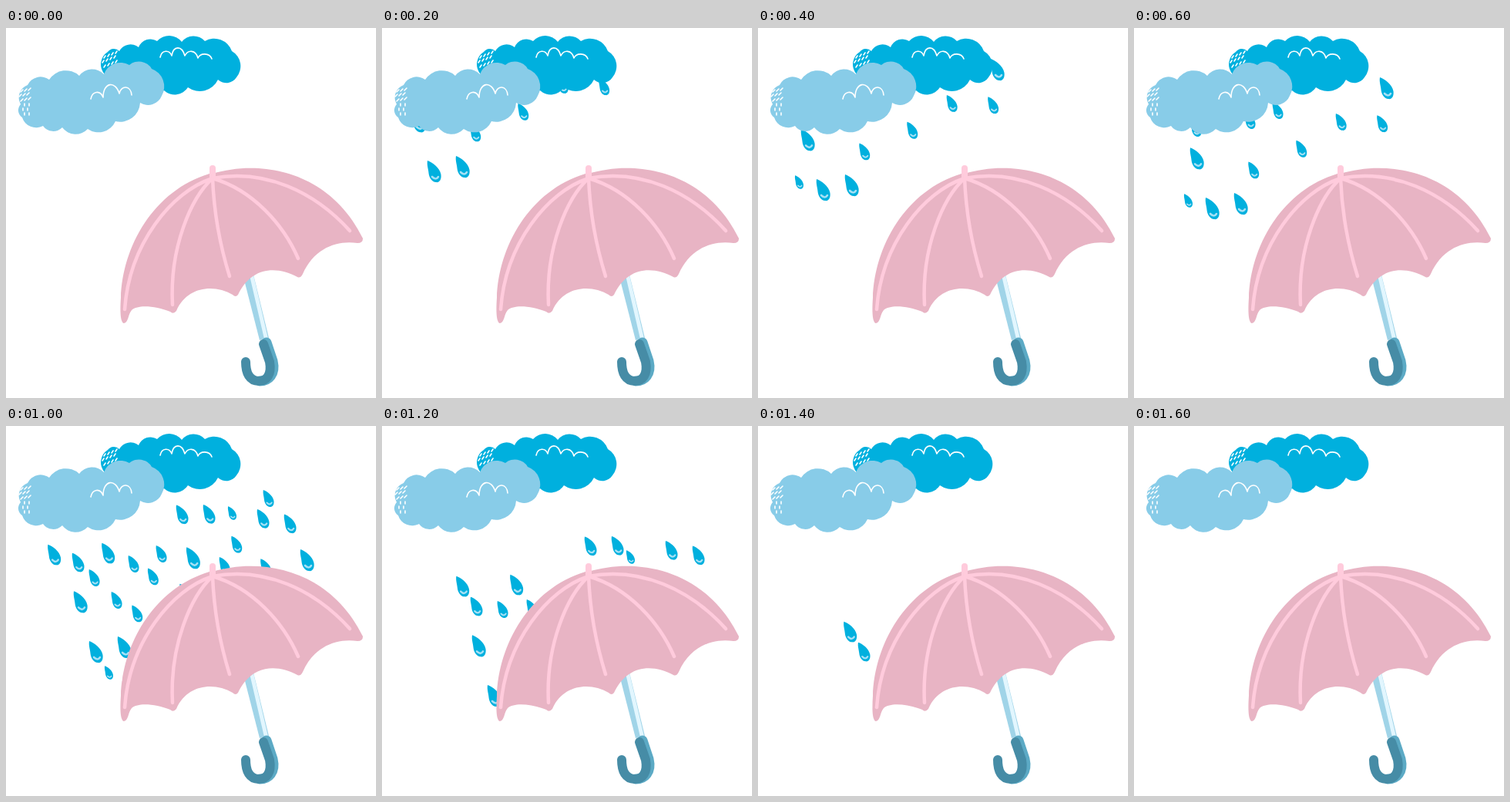
An HTML page for the animation above (1.8 s loop, 480x480 px).

```html
<!DOCTYPE html>
<html>
<head>
<meta charset="utf-8">
<style>
html, body { margin: 0; width: 100%; height: 100%; overflow: hidden; background: #fff; }
svg { display: block; width: 100vw; height: 100vh; }
.line { fill: none; stroke-linecap: round; stroke-linejoin: round; }
.chalk { stroke: #fff; stroke-width: 1.6; }
</style>
</head>
<body>
<svg viewBox="0 0 480 480">
  <defs>
    <g id="drop">
      <path fill="#00b0de" d="M-8-14C-2-12 8-5 9.5 4C10.5 11 7 15 3 14C-2 14-6 8-6.5 2C-7-4-9-8-8-14Z"/>
      <path class="line" stroke="#a5e0f5" stroke-width="2.6" d="M-2 7Q3 12 6 7"/>
    </g>
  </defs>
  <g id="rain"></g>

  <path id="darkCloud" fill="#00b0de"/>
  <path class="line chalk" d="M200 38C202 28 212 28 215 36C217 23 228 22 232 36C236 28 246 28 249 39C252 32 264 32 267 40"/>
  <path id="darkDashes" class="line chalk"/>
  <path id="lightCloud" fill="#88cce8"/>
  <path class="line chalk" d="M110 92C112 82 122 80 126 90C126 70 142 68 147 85C149 74 162 74 163 87"/>
  <path id="lightDashes" class="line chalk"/>

  <path fill="#a0d4e8" d="M308 323L321 320L341 402L329 405Z"/>
  <path class="line" stroke="#e2f6fe" stroke-width="5" d="M319 323L337 401"/>
  <g class="line" stroke-width="12">
    <path stroke="#5caac5" stroke-width="13" d="M338 408L346 432C350 449 341 458 329 458"/>
    <path stroke="#468ca6" d="M334 410L342 433C345 450 338 458 328 458C316 458 311 448 311 433"/>
  </g>

  <path fill="#e8b4c4" d="M149 350C151 284 191 211 264 189H268C330 170 420 185 463 273Q463 279 456 279C430 275 400 285 385 319Q382 325 378 323C350 308 318 310 301 346Q298 350 294 346C270 332 235 335 221 367Q217 372 213 368C195 361 172 358 163 366C158 372 159 382 153 383C148 382 148 365 149 350Z"/>
  <g class="line" stroke="#ffcbdc" stroke-width="4.5">
    <path d="M268 195C215 212 160 280 154 365M268 195C240 220 212 285 216 359M268 195C270 245 280 290 290 322M268 195C320 210 360 255 379 299M268 195C335 182 400 212 446 263"/>
    <path stroke-width="8" d="M268 182V194"/>
  </g>
</svg>
<script>
const STEP = 200, STEPS = 9;
const byId = id => document.getElementById(id);
const row = (count, place) => Array.from({ length: count }, (_, i) => place(i));

// A cloud outline: one round puff between each pair of neighbouring notches.
function cloud(id, notches) {
  const puffs = notches.map(([x, y], i) => {
    const [px, py] = notches.at(i - 1);
    const r = .65 * Math.hypot(x - px, y - py);
    return `A${r} ${r} 0 0 1 ${x} ${y}`;
  });
  byId(id).setAttribute('d', `M${notches.at(-1)}${puffs.join('')}`);
}
cloud('darkCloud', [[128, 60], [132, 31], [147, 30], [172, 25], [196, 17], [228, 18], [258, 17],
  [293, 30], [299, 64], [275, 67], [236, 77], [205, 81]]);
cloud('lightCloud', [[19, 99], [28, 74], [56, 67], [95, 62], [127, 60], [160, 48], [189, 53],
  [202, 88], [174, 97], [142, 121], [106, 131], [73, 129], [48, 127], [21, 116]]);

function dashes(cols, rows, x, y, dx, slope, mark) {
  return row(cols * rows, i => {
    const col = i % cols, line = Math.floor(i / cols);
    return `M${x + col * dx - line % 2 * 2} ${y + col * slope + line * 6}${mark}`;
  }).join('');
}
byId('darkDashes').setAttribute('d', dashes(4, 3, 129, 36, 5, -2, 'l-2 3'));
byId('lightDashes').setAttribute('d',
  dashes(3, 3, 22, 80, 5, -1, 'l-3 3') + dashes(2, 3, 24, 98, 6, 0, 'v3'));

// Each wave of drops starts at one step and then makes one move per step.
const L = 1, M = .78, S = .62;
const still = [0, 0], drift = [17, 24], gust = [42, 41], slant = [21, 55], slide = [29, 57], fall = [15, 59];
const waves = [
  { start: 1, moves: [drift, drift, still, fall, slide], drops: [
    ...row(5, i => [47 + 63 * i + 12 * Math.sin(1.1 * i), 103 + 34 * Math.cos(1.2 * i - 1), i ? M : L]),
    ...row(2, i => [67 + 37 * i, 186 - 6 * i, L]),
    ...row(2, i => [116 + 36 * i, 72 - 13 * i, M])] },
  { start: 2, moves: [drift, gust, slant], drops: [
    ...row(4, i => [63 + 45 * i + 2.3 * i * i, 106 - 34 * i + 3.3 * i * i, i === 2 ? L : M]),
    [310, 54, L], [53, 200, S]] },
  { start: 4, moves: [slant, gust], drops: [[93, 142, M]] },
  { start: 5, moves: [gust], drops:
    [-2, -1, 1, 2].map(i => [298 + 35 * i, 116 + 3 * i + 1.2 * i * i, .88]) },
  { start: 5, moves: [gust, fall], drops: row(2, i => [62 + 70 * i, 167 - 2 * i, .95]) },
  { start: 5, moves: [slide, fall], drops: [[93, 177, .88], [293, 113, S]] },
  { start: 5, moves: [], drops: [[340, 94, M]] }
];

function waveAt(step, { start, moves, drops }) {
  const age = step - start;
  if (age < 0 || age > moves.length) return '';
  const [dx, dy] = moves.slice(0, age).reduce(([x, y], [mx, my]) => [x + mx, y + my], still);
  return drops.map(([x, y, size]) =>
    `<use href="#drop" transform="translate(${x + dx} ${y + dy}) scale(${size})"/>`).join('');
}

let shown = -1;
function draw() {
  const step = Math.floor(performance.now() / STEP) % STEPS;
  if (step !== shown) {
    shown = step;
    byId('rain').innerHTML = waves.map(wave => waveAt(step, wave)).join('');
  }
  requestAnimationFrame(draw);
}
draw();
</script>
</body>
</html>
```
